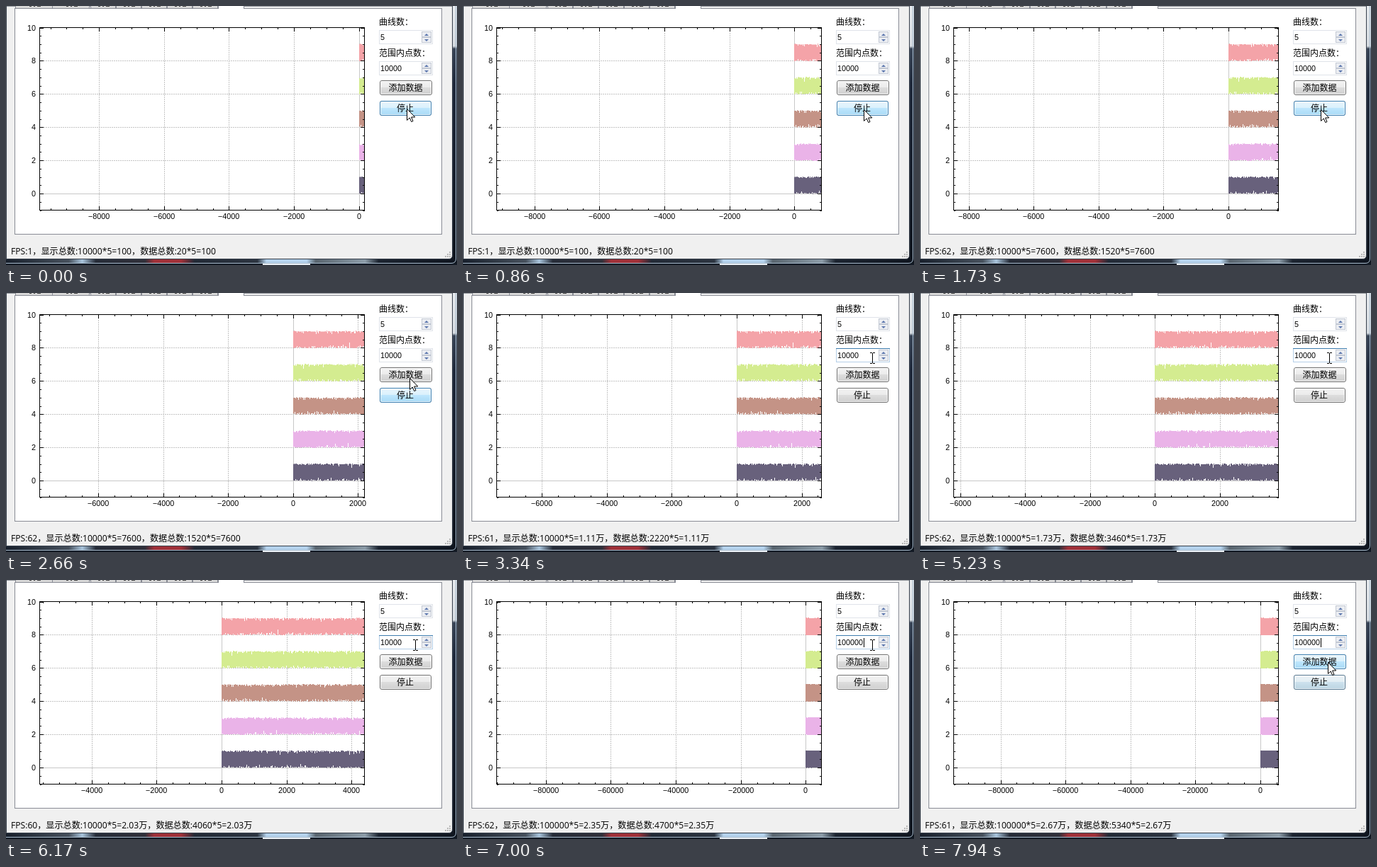
Write an HTML page that moves like this. It is 636x366 px and loops after 8000 ms.

```html
<!DOCTYPE html>
<html lang="zh-CN">
<head>
<meta charset="utf-8">
<style>
  html, body { margin: 0; width: 100%; height: 100%; overflow: hidden; background: #f0f0f0; }
  svg { display: block; shape-rendering: crispEdges; }
  text { fill: #000; white-space: pre; }
  .ui { font: 12px "Noto Sans CJK SC", "Noto Sans CJK JP", sans-serif; }
  .num { font: 10.8px "Liberation Sans", Arial, sans-serif; }
  .status { font: 12.12px "Open Sans", "Noto Sans CJK SC", "Noto Sans CJK JP", sans-serif; }
  .smooth { shape-rendering: auto; }
</style>
</head>
<body>
<svg width="636" height="366" viewBox="0 0 636 366">
  <defs>
    <linearGradient id="normal" x2="0" y2="1">
      <stop offset="0" stop-color="#f3f3f3"/><stop offset=".5" stop-color="#ebebeb"/>
      <stop offset=".5" stop-color="#dddddd"/><stop offset="1" stop-color="#cfcfcf"/>
    </linearGradient>
    <linearGradient id="hot" x2="0" y2="1">
      <stop offset="0" stop-color="#eaf6fd"/><stop offset=".5" stop-color="#d9f0fc"/>
      <stop offset=".5" stop-color="#bee6fd"/><stop offset="1" stop-color="#a7d9f5"/>
    </linearGradient>
    <linearGradient id="desk">
      <stop offset="0" stop-color="#18202c"/><stop offset=".14" stop-color="#46505c"/>
      <stop offset=".17" stop-color="#a8c4dc"/><stop offset=".2" stop-color="#262c38"/>
      <stop offset=".31" stop-color="#30303a"/><stop offset=".33" stop-color="#a03038"/>
      <stop offset=".39" stop-color="#a03038"/><stop offset=".42" stop-color="#222a36"/>
      <stop offset=".56" stop-color="#2c3440"/><stop offset=".58" stop-color="#b4d2ec"/>
      <stop offset=".67" stop-color="#b4d2ec"/><stop offset=".69" stop-color="#58646e"/>
      <stop offset=".8" stop-color="#8c9ca8"/><stop offset=".83" stop-color="#1c2430"/>
      <stop offset="1" stop-color="#101620"/>
    </linearGradient>
    <linearGradient id="side" x2="0" y2="1">
      <stop offset="0" stop-color="#e4e8ec"/><stop offset=".155" stop-color="#d4dae0"/>
      <stop offset=".165" stop-color="#3a4658"/><stop offset=".3" stop-color="#202a3c"/>
      <stop offset="1" stop-color="#10161f"/>
    </linearGradient>
    <clipPath id="plotClip"><rect x="48" y="31" width="457" height="257"/></clipPath>
  </defs>

  <rect width="636" height="366" fill="url(#side)"/>
  <rect y="357" width="633" height="9" fill="url(#desk)"/>
  <rect y="364" width="636" height="2" fill="#141b26"/>
  <rect x="362" y="364" width="67" height="2" fill="#e8eef4"/>
  <path class="smooth" d="M0 363.5H628Q634.5 363.5 634.5 357V0" fill="none" stroke="#a9bccd"/>
  <path class="smooth" d="M.5 0H629.5V352Q629.5 357.5 624 357.5H.5Z" fill="#f0f0f0" stroke="#39414d"/>
  <g id="tabs"></g>
  <path d="M12.5 3.5H614.5V322.5H12.5Z" fill="#fff" stroke="#898c95"/>
  <rect x="300" width="35" height="5" fill="#fff"/>
  <path d="M299.5 0V4M335.5 0V4" stroke="#898c95"/>
  <path id="grip" fill="#b8b8b8"/>

  <g fill="none" stroke="#c4c4c4">
    <path id="dotted" stroke-dasharray="2 1"/>
    <path id="zeroLines" stroke="#c8c8c8"/>
  </g>
  <g id="bands" clip-path="url(#plotClip)"></g>
  <path id="axes" fill="none" stroke="#000"/>
  <g id="yLabels" class="num" text-anchor="end"></g>
  <g id="xLabels" class="num" text-anchor="middle"></g>

  <g id="panel"></g>
  <text id="status" class="status" x="7" y="351"></text>
  <path id="arrow" class="smooth" fill="#fff" stroke="#000"
        d="M.5 .5V16.5L4.2 13L6.7 18.6L9 17.6L6.6 12H11.8Z"/>
  <path id="beam" fill="none" stroke="#000" d="M-3 -7.5H0M1 -7.5H4M.5 -7V7M-3 7.5H0M1 7.5H4"/>
</svg>
<script>
const $ = id => document.getElementById(id);
const LOOP = 8000, TYPED = 6580;
const plot = { left: 47.5, right: 505.5, top: 30.5, bottom: 288.5 };
const colors = ['#68617c', '#eab3e8', '#c49386', '#d4ec90', '#f4a3a8'];

// Screen refreshes: [first, last, count], evenly spaced.
const refreshes = [[0, 0, 1], [150, 1120, 8], [1270, 1730, 4], [1880, 2270, 4], [2420, 2660, 3],
  [2780, 3460, 6], [3590, 4010, 4], [4140, 4560, 4], [4710, 5230, 5], [5370, 5640, 3],
  [5760, 6170, 4], [6300, 6720, 4], [6870, 7810, 8], [7940, 7940, 1]]
  .flatMap(([a, b, n]) => Array.from({ length: n }, (_, i) => Math.round(a + (b - a) * i / Math.max(1, n - 1))));

const progress = [[0, 172], [1730, 1539], [2660, 2200], [4010, 3035], [5230, 3803], [6170, 4400], [7940, 5568]];
const reports = [[20, 1], [880, 60], [1520, 62], [2220, 61], [2820, 60], [3460, 62], [4060, 60], [4700, 62], [5340, 61]];
const pointerX = [[0, 565], [2270, 565], [2660, 569], [2920, 577], [6990, 577], [7300, 575]];
const pointerY = [[0, 145], [400, 145], [420, 146], [2270, 146], [2660, 120], [2920, 92], [6990, 92], [7300, 116]];
const stopHeat = [[0, 1], [2700, 1], [3200, 0], [7100, 0], [7700, .5]];
const addHeat = [[0, 0], [2660, 0], [2780, .3], [3200, 0], [7050, 0], [7500, 1]];

function tween(keys, t) {
  const i = keys.findIndex(k => k[0] > t);
  if (i < 0) return keys[keys.length - 1][1];
  if (!i) return keys[0][1];
  const [t0, a] = keys[i - 1], [t1, b] = keys[i];
  return a + (b - a) * (t - t0) / (t1 - t0);
}

const hash = n => { const s = Math.sin(n * 12.9898 + 4.1) * 43758.5453; return s - Math.floor(s); };
const yOf = v => plot.bottom - (v + 1) * (plot.bottom - plot.top) / 11;
const snap = v => Math.round(v) + .5;
const label = v => String(v).replace('-', '\u2212');

function spin(y, id) {
  const triangle = (dy, up) => `<path class="smooth" fill="#5b76ad" d="M590 ${y + dy}h6l-3 ${up ? -3 : 3}z"/>`;
  const half = dy => `<rect x="586.5" y="${y + dy + .5}" width="13" height="7" fill="#eceef2" stroke="#c3c9d4"/>`;
  return `<rect id="${id}Box" x="526.5" y="${y + .5}" width="75" height="19" fill="#fff" stroke="#dfe3e9"/>
    <path id="${id}Focus" d="M526 ${y + .5}H602" stroke="#3d7bad"/>
    ${half(2)}${half(10)}${triangle(8, true)}${triangle(13, false)}
    <text id="${id}" class="num" x="528" y="${y + 14}"></text>`;
}

function button(y, width, id, caption) {
  const face = (fill, stroke, extra) => `<g class="smooth" ${extra}>
    <rect x="527.5" y="${y + .5}" width="${width}" height="20" rx="2.5" fill="url(#${fill})" stroke="${stroke}"/>
    <rect x="528.5" y="${y + 1.5}" width="${width - 2}" height="18" rx="1.5" fill="none" stroke="#fff" opacity=".75"/></g>`;
  return face('normal', '#707070', '') + face('hot', '#3c7fb1', `id="${id}"`) +
    `<text class="ui" x="${527 + width / 2}" y="${y + 15}" text-anchor="middle">${caption}</text>`;
}

function buildStatic() {
  $('tabs').innerHTML = [14, 66, 120, 156, 192, 228, 264].map((x, i) => {
    const w = i < 2 ? 53 : 36;
    return `<path d="M${x - .5} -2V3.5H${x + w - 1.5}V-2Z" fill="#d8d8d8" stroke="#898c95"/>
      <path d="M${x + w / 2 - 8} .5h3m3 0h2m3 0h5" stroke="#444"/>`;
  }).join('');
  let dots = '';
  for (let r = 0; r < 3; r++) for (let c = 0; c <= r; c++) dots += `M${625 - c * 3} ${347 + r * 3}h2v2h-2z`;
  $('grip').setAttribute('d', dots);
  $('yLabels').innerHTML = [0, 2, 4, 6, 8, 10].map(v => `<text x="42" y="${yOf(v) + 4}">${v}</text>`).join('');
  $('bands').innerHTML = colors.map(c => `<path fill="${c}"/>`).join('');
  $('panel').innerHTML = `<text class="ui" x="526" y="26.5">曲线数：</text>${spin(34, 'curves')}
    <text class="ui" x="526" y="70.5">范围内点数：</text>${spin(78, 'range')}
    <path id="caret" stroke="#000"/>
    ${button(105, 73, 'addHot', '添加数据')}${button(134, 72, 'stopHot', '停止')}`;
  $('curves').textContent = '5';
  $('curvesFocus').style.display = 'none';
}

function drawAxes(xMax, range) {
  const step = range / 5, scale = (plot.right - plot.left) / range;
  const xOf = v => plot.right - (xMax - v) * scale;
  const { left, right, top, bottom } = plot;
  let d = `M${left} ${top}H${right}V${bottom}H${left}Z`, dotted = '', labels = '';
  for (let i = Math.ceil((xMax - range) / step * 4); i * step / 4 <= xMax; i++) {
    const v = i * step / 4, x = snap(xOf(v)), major = i % 4 === 0, len = major ? 5.5 : 2.5;
    d += `M${x} ${top}v${len}M${x} ${bottom}v${-len}`;
    if (!major) continue;
    if (v) dotted += `M${x} ${bottom}V${top}`;
    labels += `<text x="${x - .5}" y="301">${label(v)}</text>`;
  }
  for (let i = -2; i <= 20; i++) {
    const y = snap(yOf(i / 2)), major = i % 4 === 0, len = major ? 5.5 : 2.5;
    d += `M${left} ${y}h${len}M${right} ${y}h${-len}`;
    if (major && i && i < 20) dotted += `M${left - 1} ${y}H${right}`;
  }
  const x0 = snap(xOf(0));
  $('axes').setAttribute('d', d);
  $('dotted').setAttribute('d', dotted);
  $('zeroLines').setAttribute('d', `M${left} ${snap(yOf(0))}H${right}M${x0} ${top}V${bottom}`);
  $('xLabels').innerHTML = labels;
  return Math.floor(x0);
}

// Each pixel column spans the extremes of the random samples that fall in it.
function drawBands(x0, range) {
  const samples = range / 458;
  [...$('bands').children].forEach((path, k) => {
    let d = '';
    for (let x = x0; x < 505; x++) {
      const seed = (x - x0) * 2 + k * 1373;
      const low = 1 - hash(seed) ** (1 / samples), high = hash(seed + 1) ** (1 / samples);
      const y1 = Math.round(yOf(2 * k + high) - .5), y2 = Math.round(yOf(2 * k + low) - .5) + 1;
      d += `M${x} ${y1}h1V${y2}h-1z`;
    }
    path.setAttribute('d', d);
  });
}

const amount = n => n < 10000 ? n : (n / 10000).toFixed(2) + '万';

function drawPanel(t, points, range) {
  const focused = t >= 3050, typed = t >= TYPED;
  $('range').textContent = range;
  $('rangeFocus').style.display = focused ? '' : 'none';
  $('rangeBox').setAttribute('stroke', focused ? '#b5cfe7' : '#dfe3e9');
  const caretOn = typed || focused && Math.floor((t - 3050) / 1060) % 2 === 1;
  $('caret').setAttribute('d', caretOn ? `M${typed ? 565.5 : 559.5} 82V95` : '');
  $('stopHot').setAttribute('opacity', tween(stopHeat, t));
  $('addHot').setAttribute('opacity', tween(addHeat, t));

  const [count, fps] = reports.filter(r => r[0] <= points).pop();
  const total = amount(count * 5);
  const shown = count >= 4700 && typed ? 100000 : 10000;
  $('status').textContent = `FPS:${fps}，显示总数:${shown}*5=${total}，数据总数:${count}*5=${total}`;

  const x = Math.round(tween(pointerX, t)), y = Math.round(tween(pointerY, t));
  const overField = y < 98;
  for (const id of ['arrow', 'beam']) {
    $(id).setAttribute('transform', `translate(${x} ${y})`);
    $(id).style.display = (id === 'beam') === overField ? '' : 'none';
  }
}

let shownAt = -1;
function render(time) {
  const t = refreshes.filter(r => r <= time).pop();
  if (t === shownAt) return;
  shownAt = t;
  const points = tween(progress, t), range = t >= TYPED ? 100000 : 10000;
  drawBands(drawAxes(points, range), range);
  drawPanel(t, points, range);
}

buildStatic();
const start = performance.now();
function tick() {
  render((performance.now() - start) % LOOP);
  requestAnimationFrame(tick);
}
tick();
</script>
</body>
</html>
```
